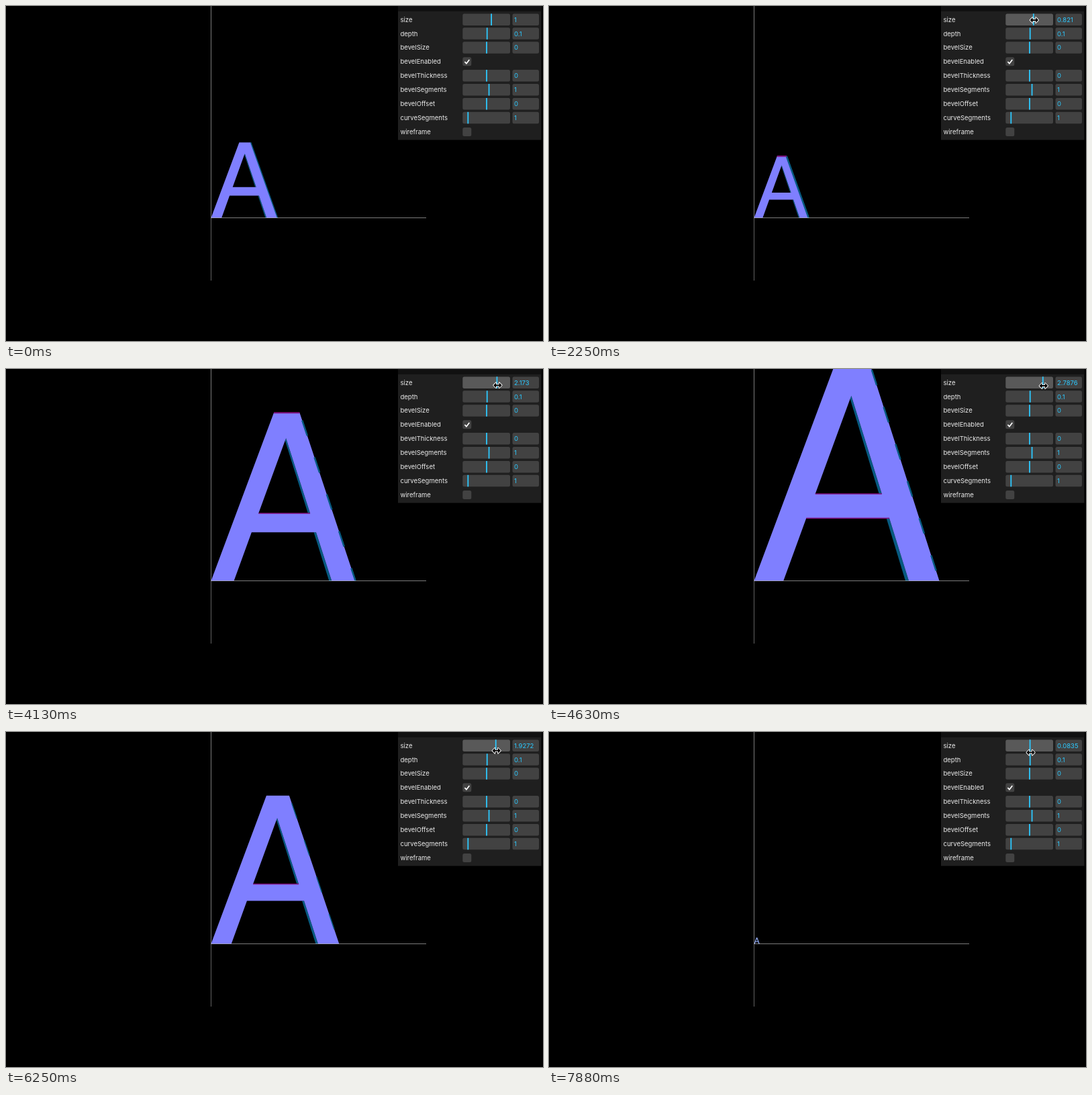
An HTML page with a canvas for the animation above (8000 ms loop, 800 by 499 pixels).

```html
<!DOCTYPE html>
<html lang="en">
<head>
<meta charset="utf-8">
<title>Text geometry controls</title>
<style>
html, body { margin: 0; height: 100%; overflow: hidden; background: #000; }
canvas { display: block; }
</style>
</head>
<body>
<canvas id="stage" width="800" height="499"></canvas>
<script>
const ctx = document.getElementById('stage').getContext('2d');
const LOOP = 8000, STEP = 125;
const OX = 305.5, OY = 315.5;
const FACE = '#7f7fff', TEAL = '#075a80', MAGENTA = '#80107f', BLUE = '#2cc9ff';

// [time, drag distance in mouse pixels]
const DRAG = [[2125, 0], [2750, 0], [3375, 3], [4125, 11], [4500, 15], [4875, 18], [5125, 18],
  [5500, 15], [6250, 9], [7125, 1], [7500, -4], [7625, -4], [7750, -5], [7875, -6]];
// [time, x] and [time, y] of the pointer before the drag
const ENTER_X = [[700, 753], [1000, 753], [1125, 755], [1750, 723]];
const ENTER_Y = [[700, -14], [1000, 8], [1125, 14], [1750, 20]];

// Letter outline: x in pixels per size unit, y as a fraction of the cap height
const OUTER = [[0, 0], [41, 1], [57.9, 1], [99, 0], [82.7, 0], [71, .299], [27.4, .299], [15.7, 0]];
const HOLE = [[49.3, .855], [66.6, .413], [31.9, .413]];

const ROWS = [['size'], ['depth', .51, '0.1'], ['bevelSize', .5, '0'], ['bevelEnabled', true],
  ['bevelThickness', .5, '0'], ['bevelSegments', .55, '1'], ['bevelOffset', .5, '0'],
  ['curveSegments', .11, '1'], ['wireframe', false]];

function keyed(keys, t) {
  if (t <= keys[0][0]) return keys[0][1];
  for (let i = 1; i < keys.length; i++) {
    const [t0, a] = keys[i - 1], [t1, b] = keys[i];
    if (t <= t1) return a + (b - a) * (t - t0) / (t1 - t0);
  }
  return keys[keys.length - 1][1];
}

function rect(x, y, w, h, color, r = 0) {
  ctx.fillStyle = color;
  ctx.beginPath();
  ctx.roundRect(x, y, w, h, r);
  ctx.fill();
}

function line(points, color, width) {
  ctx.strokeStyle = color;
  ctx.lineWidth = width;
  ctx.beginPath();
  points.forEach(p => ctx.lineTo(...p));
  ctx.stroke();
}

function addPoly(points) {
  points.forEach((p, i) => i ? ctx.lineTo(...p) : ctx.moveTo(...p));
  ctx.closePath();
}

function drawLetter(size, t) {
  const project = ([x, y]) => {
    const d = size / (1 - .0215 * y * size);
    return [OX + x * d, OY - 109.8 * y * d];
  };
  const inner = (a, b) => {
    const back = ([x, y]) => project([x * .978, y]);
    ctx.fillStyle = TEAL;
    ctx.beginPath();
    addPoly([project(a), project(b), back(b), back(a)]);
    ctx.fill();
  };
  const growing = t >= 2000 && t < 5000;

  inner(HOLE[0], HOLE[1]);
  inner(OUTER[5], OUTER[4]);

  ctx.fillStyle = size < .25 ? '#9ab4ff' : FACE;
  ctx.beginPath();
  addPoly(OUTER.map(project));
  addPoly(HOLE.map(project));
  ctx.fill('evenodd');

  if (size > .25) {
    if (size > 1.5) {
      ctx.setLineDash([24, 34]);
      ctx.lineDashOffset = -70;
    }
    line([project(OUTER[2]), project(OUTER[3])], TEAL, growing ? 2.5 : 1.5);
    ctx.setLineDash([]);
  }
  if (growing) line([project(OUTER[1]), project(OUTER[2])], MAGENTA, 2);
  if (size > 1.5) line([project(HOLE[1]), project(HOLE[2])], MAGENTA, 1.5);
  if (size > 2.4) line([project(OUTER[5]), project(OUTER[6])], MAGENTA, 1.5);
}

function drawAxes() {
  const white = a => `rgba(255,255,255,${a})`;
  rect(305, 0, 1, 315, white(.48));
  rect(305, 316, 1, 93, white(.38));
  rect(305, 315, 321, 1, white(.48));
}

function drawPanel(size, label, sliderColor) {
  rect(584, 0, 213.5, 199.5, '#1f1f1f');
  rect(584, 0, 213.5, 8, '#111');
  ctx.font = '9.5px Inter, sans-serif';
  ctx.textBaseline = 'alphabetic';
  ROWS.forEach(([name, value, text], i) => {
    const y = 20.2 + i * 20.92, top = y - 8.8;
    ctx.fillStyle = '#ebebeb';
    ctx.fillText(name, 587.5, y + 3.4);
    if (typeof value === 'boolean') {
      rect(680.3, y - 6.6, 13, 13, '#424242', 2.5);
      if (value) line([[683.4, y], [685.9, y + 2.7], [690.3, y - 3]], '#fff', 1.7);
      return;
    }
    const at = i ? value : .5 + size / 10;
    rect(680.3, top, 70.7, 17.5, i ? '#424242' : sliderColor, 2.5);
    rect(679.6 + at * 71, top, 1.8, 17.5, BLUE);
    rect(754.5, top, 39.5, 17.5, '#424242', 2.5);
    ctx.fillStyle = BLUE;
    ctx.fillText(i ? text : label, 757, y + 3.4);
  });
}

function drawPointer(x, y, resizing) {
  ctx.save();
  ctx.translate(x, y);
  ctx.beginPath();
  addPoly(resizing
    ? [[-6.2, 0], [-2.3, -4], [-2.3, -1], [2.3, -1], [2.3, -4], [6.2, 0],
       [2.3, 4], [2.3, 1], [-2.3, 1], [-2.3, 4]]
    : [[0, 0], [0, 11], [2.6, 8.7], [4.3, 12.4], [6, 11.6], [4.4, 8], [7.8, 8]]);
  ctx.lineJoin = 'round';
  ctx.lineWidth = 1.8;
  ctx.strokeStyle = '#fff';
  ctx.stroke();
  ctx.fillStyle = '#000';
  ctx.fill();
  ctx.restore();
}

function draw(t) {
  const dragging = t >= 2125;
  const size = dragging ? .821 + .122913 * Math.round(keyed(DRAG, t)) : 1;
  let x = keyed(ENTER_X, t), y = keyed(ENTER_Y, t);
  if (dragging) {
    x = 717 + size * 7.1;
    y = 21 + (t - 2250) * .0017;
  }
  const over = t > 1000 && x < 751;
  const sliderColor = dragging ? '#595959' : over ? '#4f4f4f' : '#424242';

  rect(0, 0, 800, 499, '#000');
  drawLetter(size, t);
  drawAxes();
  drawPanel(size, String(+size.toFixed(4)), sliderColor);
  if (t >= 700) drawPointer(x, y, over);
}

const start = performance.now();
function tick() {
  const t = (performance.now() - start) % LOOP;
  draw(Math.floor(t / STEP) * STEP);
  requestAnimationFrame(tick);
}
tick();
</script>
</body>
</html>
```
